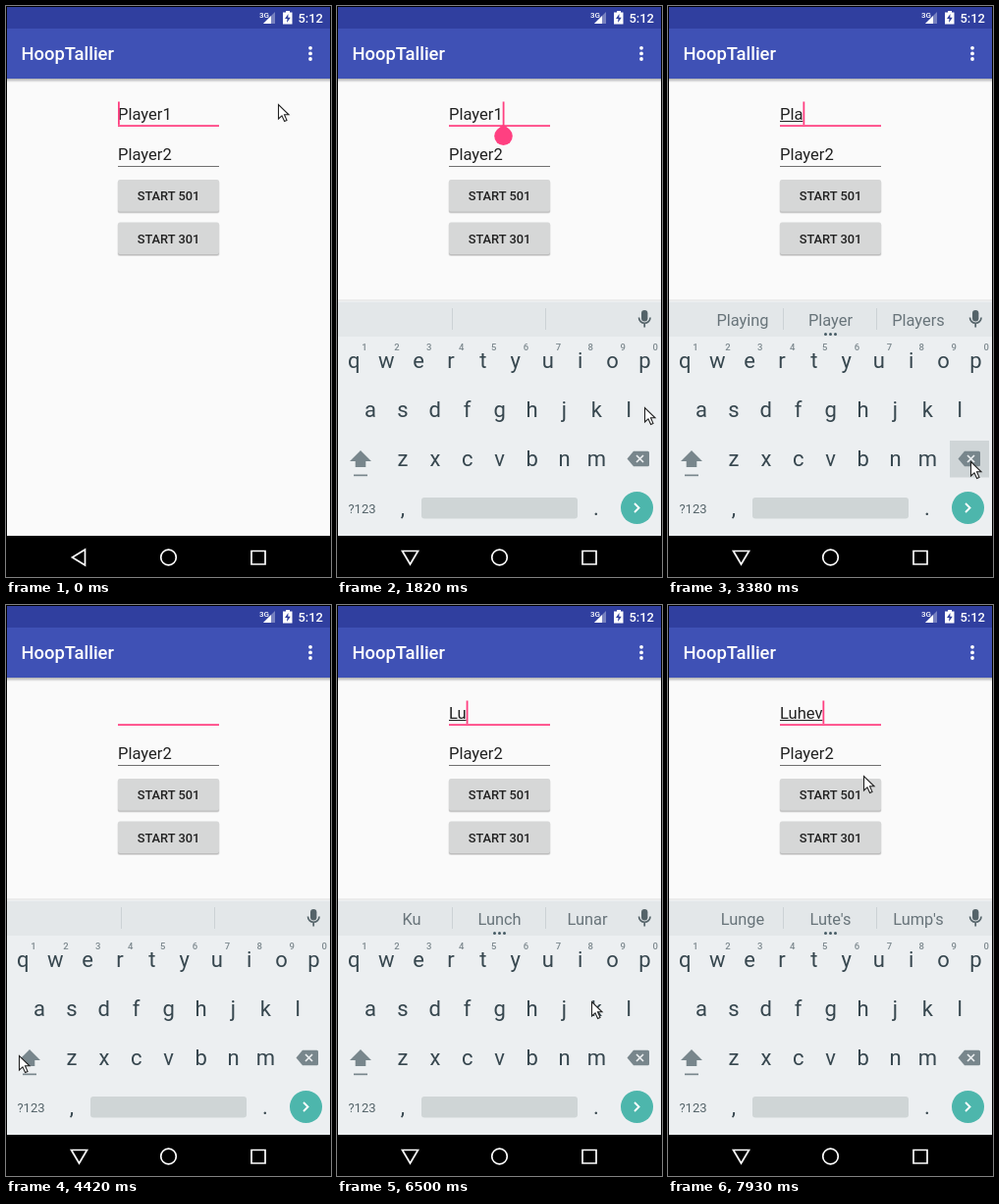
Recreate the animation shown at these times as an HTML page. Size 331 by 582 pixels, loop 8000 ms.

```html
<!DOCTYPE html>
<html lang="en">
<head>
<meta charset="utf-8">
<style>
html, body { margin: 0; width: 100%; height: 100%; overflow: hidden; background: #000; }
svg { display: block; width: 331px; height: 582px; font-family: Roboto, sans-serif; }
.bold { font-weight: 500; }
.mid { text-anchor: middle; }
.field { font-size: 16.55px; fill: #212121; }
.button { font-size: 12.87px; fill: #212121; }
.key { font-size: 22px; fill: #37474f; }
.hint { font-size: 9.5px; font-weight: 500; fill: #7d898f; }
.word { font-size: 16.4px; fill: #68747a; }
.nav { fill: none; stroke: #fff; stroke-width: 1.7; }
</style>
</head>
<body>
<svg viewBox="0 0 331 582">
  <defs>
    <linearGradient id="fade" x2="0" y2="1">
      <stop stop-opacity=".3"/><stop offset="1" stop-opacity="0"/>
    </linearGradient>
    <clipPath id="screen"><path d="M1 1H330V540H1z"/></clipPath>
    <g id="btn">
      <rect x="113.5" y="1" width="104" height="33.5" rx="2.5" opacity=".1"/>
      <rect x="114" y="1" width="103" height="32.7" rx="2" opacity=".16"/>
      <rect x="114" width="103" height="32.5" rx="2" fill="#d6d7d7"/>
    </g>
  </defs>

  <path d="M0 0H331V582H0z"/>
  <path d="M1 1H330V540H1z" fill="#fafafa"/>
  <path d="M1 74H330V78H1z" fill="url(#fade)"/>
  <path d="M1 23H330V74H1z" fill="#3f51b5"/>
  <path d="M1 1H330V23H1z" fill="#303f9f"/>

  <g fill="#fff">
    <text class="bold" x="15.5" y="55" font-size="18.4">HoopTallier</text>
    <text class="bold" x="297.5" y="17" font-size="12.9">5:12</text>
    <text class="bold" x="258" y="11.5" font-size="8">3G</text>
    <path d="M262 18L274 6V18z" opacity=".35"/>
    <path d="M262 18L270 10V18z"/>
    <path d="M282 6.5H285V5H289V6.5H291.500V18.500H282z"/>
    <path d="M287.500 8L284 13H286.500L286 17L289.800 11.800H287.300z" fill="#303f9f"/>
    <circle cx="310" cy="42.800" r="1.900"/>
    <circle cx="310" cy="48.400" r="1.900"/>
    <circle cx="310" cy="54" r="1.900"/>
  </g>

  <path d="M114 121.300H217V123H114z" fill="#ff4081"/>
  <path d="M114 163H217V164H114z" fill="#707070"/>
  <text id="name" class="field" x="114" y="115.500"></text>
  <rect id="under" x="114" y="117" height="1" fill="#212121"/>
  <rect id="caret" y="97.500" width="1.800" height="23.500" fill="#ff4081"/>
  <path id="handle" d="M169.500 120.500L176 126A9.300 9.300 0 1 1 163 126z" fill="#ff4081"/>
  <text class="field" x="114" y="156.500">Player2</text>
  <use href="#btn" y="177"/>
  <use href="#btn" y="220.500"/>
  <text class="button bold mid" x="165.500" y="198">START 501</text>
  <text class="button bold mid" x="165.500" y="241.500">START 301</text>

  <g clip-path="url(#screen)">
    <g id="board">
      <path d="M1 299H330V302H1z" opacity=".06"/>
      <path d="M1 301H330V540H1z" fill="#eceff1"/>
      <path d="M1 302H330V337H1z" fill="#e3e7e9"/>
      <path d="M117.500 308V330M212.500 308V330" stroke="#ccd2d5"/>
      <g id="words"></g>
      <g id="more" fill="#455a64">
        <circle cx="160.500" cy="334.500" r="1.500"/>
        <circle cx="165.500" cy="334.500" r="1.500"/>
        <circle cx="170.500" cy="334.500" r="1.500"/>
      </g>
      <rect x="310" y="310" width="6.400" height="11.500" rx="3.200" fill="#546369"/>
      <path d="M307.500 317.500A5.700 5.700 0 0 0 319 317.500M313.200 323V327.500" fill="none" stroke="#546369" stroke-width="1.700"/>
      <rect id="press" x="287" y="443" width="40" height="37.500" fill="#cfd5d7"/>
      <g id="keys"></g>
      <path id="shift" d="M24 453L35 464H29.300V470H18.700V464H13z"/>
      <path d="M17 477.500H31V479.200H17z" fill="#78868c"/>
      <path d="M302 453.800H316.500Q318 453.800 318 455.300V467.700Q318 469.200 316.500 469.200H302L295.500 461.500z" fill="#78868c"/>
      <path d="M305 458L312 465M312 458L305 465" stroke="#eceff1" stroke-width="1.700"/>
      <rect x="86" y="501" width="159" height="21.500" rx="3" fill="#cfd5d6"/>
      <text class="mid" x="25.500" y="516.500" font-size="13" fill="#546369">?123</text>
      <text class="key mid" x="67" y="519">,</text>
      <text class="key mid" x="264" y="519">.</text>
      <circle cx="305.500" cy="511.500" r="16.500" fill="#4db6ac"/>
      <path d="M303 507L307.500 511.500L303 516" fill="none" stroke="#fff" stroke-width="1.900"/>
    </g>
  </g>

  <path id="back" class="nav"/>
  <circle class="nav" cx="165.500" cy="562" r="7.800"/>
  <path class="nav" d="M250 555.500H264V569H250z"/>
  <path id="mouse" d="M.500 .500V15L4 11.800L6.600 17.500L9 16.400L6.500 10.800H11z" fill="#fff" stroke="#222" stroke-width="1.100"/>
</svg>
<script>
const LOOP = 8000, STEP = 130, PITCH = 32.9;
const $ = id => document.getElementById(id);

function addText(parent, cls, x, y, text) {
  const el = document.createElementNS('http://www.w3.org/2000/svg', 'text');
  el.setAttribute('class', cls + ' mid');
  el.setAttribute('x', x);
  el.setAttribute('y', y);
  el.textContent = text;
  return $(parent).appendChild(el);
}

const letters = [['qwertyuiop', 17.3, 369], ['asdfghjkl', 34, 419], ['zxcvbnm', 67, 469]]
  .flatMap(([row, x, y]) => [...row].map((c, i) => addText('keys', 'key', x + i * PITCH, y, c)));
[...'1234567890'].forEach((c, i) => addText('keys', 'hint', 28 + i * PITCH, 351, c));
const words = [76, 165.5, 255].map(x => addText('words', 'word', x, 326, ''));

// [time, typed text, suggestions]
const play = 'Playing Player Players';
const edits = [
  [0, 'Player1', ''], [2600, 'Player', play], [2860, 'Playe', play],
  [3120, 'Play', play], [3380, 'Pla', play], [3640, 'Pl', 'Plan Please Place'],
  [3770, 'P', ''], [3900, '', ''], [5330, 'L', ''], [6110, 'Lu', ''],
  [6240, 'Lu', 'Ku Lunch Lunar'], [6630, 'Luh', 'Lush Laugh Lunch'],
  [7150, 'Luhe', 'Lute Lunge Lucre'], [7540, 'Luhev', "Lunge Lute's Lump's"]
];
const blinkStarts = [0, 780, 2600, 2860, 3120, 3380, 3640, 3770, 3900, 5330, 6110, 6630, 7150, 7540];

// [time, x, y] of the pointer tip
const path = [
  [0, 277, 100], [650, 180, 108], [910, 180, 108], [1690, 312, 405], [1820, 313, 409],
  [2340, 308, 464], [3900, 308, 464], [4290, 60, 456], [4420, 13, 459], [4680, 19, 462],
  [5070, 296, 411], [5330, 296, 411], [5720, 226, 369], [5980, 217, 365], [6110, 217, 365],
  [6500, 259, 404], [6630, 263, 411], [6760, 255, 412], [7020, 46, 412], [7150, 33, 415],
  [7410, 66, 418], [7540, 68, 417], [7930, 199, 174], [8000, 199, 174]
];

const latest = (list, t) => list.filter(e => e[0] <= t).pop();
const show = (id, on) => $(id).setAttribute('visibility', on ? 'visible' : 'hidden');

function pointer(t) {
  const i = path.findIndex(p => p[0] > t);
  const [t0, x0, y0] = path[i - 1], [t1, x1, y1] = path[i];
  const k = (t - t0) / (t1 - t0), e = k * k * (3 - 2 * k);
  return `translate(${x0 + (x1 - x0) * e} ${y0 + (y1 - y0) * e})`;
}

function draw(time) {
  const t = Math.floor(time / STEP) * STEP;
  const [, text, hints] = latest(edits, t);
  $('name').textContent = text;
  const width = text ? $('name').getComputedTextLength() : 0;
  $('under').setAttribute('width', t < 2600 ? 0 : width);
  $('caret').setAttribute('x', 114 + (t < 910 ? 0 : width));
  const since = t - blinkStarts.filter(s => s <= t).pop();
  show('caret', Math.floor(since / 500) % 2 === 0);
  show('handle', t >= 910 && t < 2600);

  const list = hints.split(' ');
  words.forEach((w, i) => w.textContent = list[i] || '');
  show('more', hints);
  show('press', [2600, 2860, 3120, 3380, 3640, 3770, 3900].includes(t));

  const caps = t >= 4680 && t < 5330;
  letters.forEach(l => {
    l.textContent = caps ? l.textContent.toUpperCase() : l.textContent.toLowerCase();
  });
  $('shift').setAttribute('fill', caps ? '#4db6ac' : '#78868c');

  const rise = Math.min(1, Math.max(0, (t - 1040) / 390));
  show('board', rise > 0);
  $('board').setAttribute('transform', `translate(0 ${240 * (1 - rise) ** 2})`);
  $('back').setAttribute('d', t < 1040 ? 'M67.500 562L80.500 554V570z' : 'M66.500 555.500H82.500L74.500 569z');
  $('mouse').setAttribute('transform', pointer(t));
}

function tick(now) {
  draw(now % LOOP);
  requestAnimationFrame(tick);
}
draw(0);
requestAnimationFrame(tick);
</script>
</body>
</html>
```
